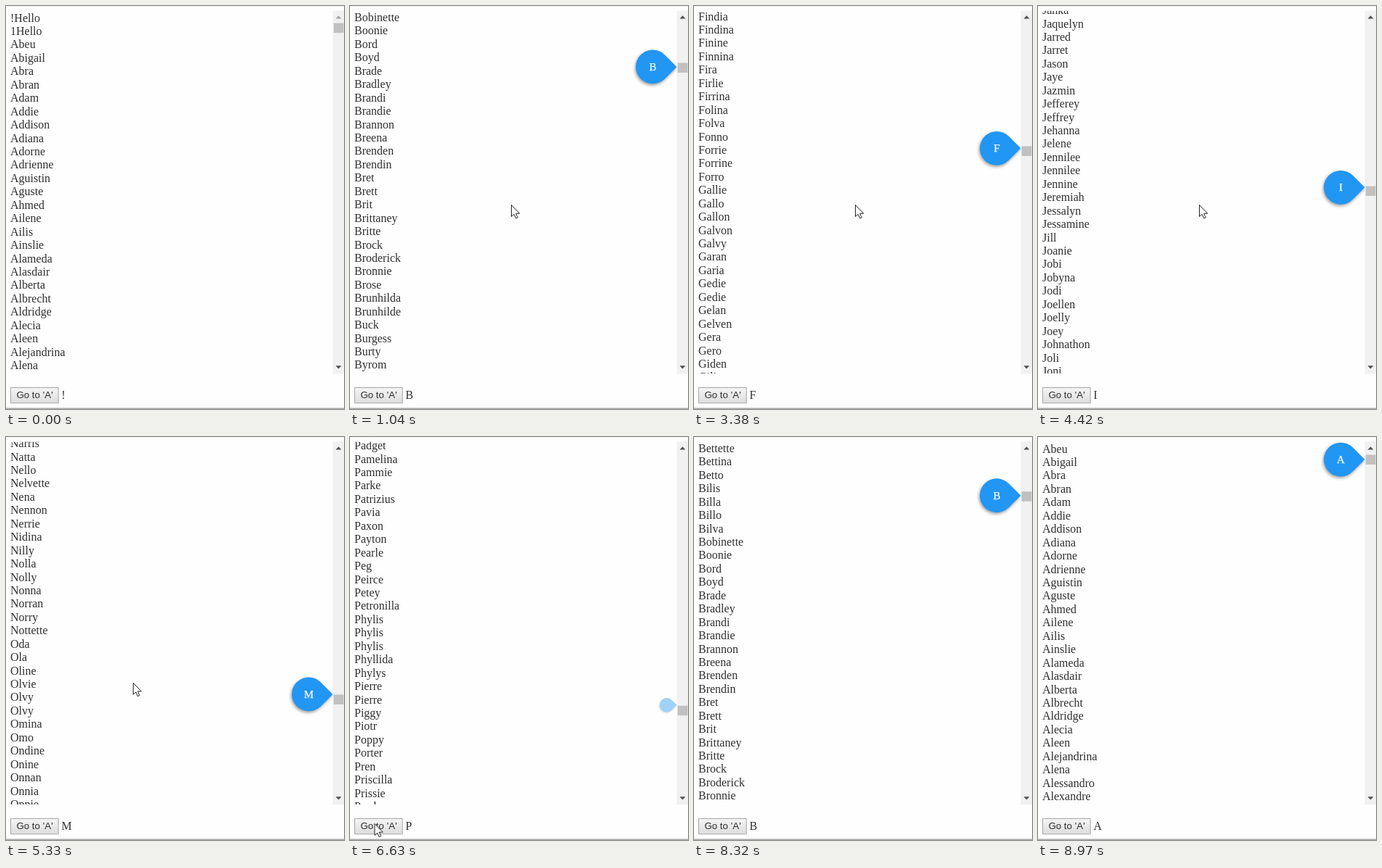
Write an HTML page that moves like this. It is 466x556 px and loops after 9.36 s.

```html
<!DOCTYPE html>
<html lang="en">
<head>
<meta charset="utf-8">
<title>Alphabet scroll list</title>
<style>
html, body { margin: 0; width: 100%; height: 100%; overflow: hidden; background: #fff; }
svg { display: block; width: 466px; height: 556px; }
text { font: 16px "Liberation Serif", "Times New Roman", serif; fill: #303030; white-space: pre; }
#button text { font: 13.33px "Liberation Sans", Arial, sans-serif; }
#bubble { filter: drop-shadow(-1px 2px 2px rgba(0, 0, 0, .4)); }
#bubble text { font-size: 15px; fill: #fff; stroke: #fff; stroke-width: .25; text-anchor: middle; }
</style>
</head>
<body>
<svg viewBox="0 0 466 556">
  <defs>
    <clipPath id="view"><rect x="0" y="6.7" width="450" height="500.3"/></clipPath>
    <linearGradient id="face" x2="0" y2="1">
      <stop stop-color="#f5f5f5"/><stop offset="1" stop-color="#dddddd"/>
    </linearGradient>
  </defs>
  <rect width="466" height="556" fill="#fefefe"/>
  <rect width="466" height="1" fill="#f0f0f0"/>
  <g id="rows" clip-path="url(#view)"></g>
  <rect x="450.5" y="6.5" width="15.5" height="501" fill="#f1f1f1"/>
  <path id="up" d="M454.5 17.5L458.5 13.2L462.5 17.5Z"/>
  <path d="M454.5 496.3L458.5 500.6L462.5 496.3Z" fill="#505050"/>
  <rect id="thumb" x="451.8" width="13.7" height="13.5" fill="#c1c1c1"/>
  <g id="bubble">
    <path d="M0 0L-16.5 16.5A23.4 23.4 0 1 1 -16.5 -16.5Z" fill="#2196f3"/>
    <text id="mark" x="-33" y="5"></text>
  </g>
  <g id="button">
    <rect x="6.5" y="526.5" width="65.7" height="21.3" fill="url(#face)" stroke="#a6a6a6"/>
    <text x="14.4" y="541.2">Go to 'A'</text>
  </g>
  <text id="status" x="76.6" y="541.8"></text>
  <rect y="554.6" width="466" height="1.1" fill="#8a8a8a"/>
  <path id="cursor" d="M0 0V16L3.7 12.7L6.2 18.4L8.7 17.3L6.2 11.7H11.3Z" fill="#fff" stroke="#222" stroke-width="1"/>
</svg>
<script>
const LOOP = 9360, STEP = 130, ROW = 18.44, ROWS_PER_PX = 2.15;
const $ = id => document.getElementById(id);
const clamp = x => Math.max(0, Math.min(1, x));
const ramp = (t, a, b) => clamp((t - a) / (b - a));
const swing = p => .5 - .5 * Math.cos(Math.PI * p);

// Filler names: seeded syllables, sorted inside each letter.
let seed = 7;
const rand = () => (seed = seed * 16807 % 2147483647) / 2147483647;
const pick = list => list[Math.floor(rand() * list.length)];
const starts = { A: 2, B: 85, C: 145, D: 226, E: 286, F: 340, G: 378, H: 412, I: 446, J: 463, K: 530,
  L: 570, M: 640, N: 705, O: 728, P: 746, Q: 800, R: 806, S: 850, T: 910, V: 955, W: 975 };
const vowels = ["a", "e", "i", "o"];
const middles = "l n r rl nd ll m rr tt nn lv d".split(" ");
const endings = "a ie y ine on ette ia an en is ina o".split(" ");
const isVowel = c => "AEIO".includes(c);

const names = [];
const letters = Object.keys(starts);
letters.forEach((c, i) => {
  const count = (starts[letters[i + 1]] || 1000) - starts[c];
  const group = Array.from({ length: count }, () =>
    c + (isVowel(c) ? "" : c === "Q" ? "ui" : pick(vowels)) + pick(middles) + pick(endings));
  group.sort().forEach((name, k) => names[starts[c] + k] = name);
});

const place = (at, list) => list.split(" ").forEach((name, k) => names[at + k] = name);
place(0, "!Hello 1Hello Abeu Abigail Abra Abran Adam Addie Addison Adiana Adorne Adrienne Aguistin Aguste " +
  "Ahmed Ailene Ailis Ainslie Alameda Alasdair Alberta Albrecht Aldridge Alecia Aleen Alejandrina Alena " +
  "Alessandro Alexandre Alfie");
place(118, "Bobinette Boonie Bord Boyd Brade Bradley Brandi Brandie Brannon Breena Brenden Brendin Bret Brett " +
  "Brit Brittaney Britte Brock Broderick Bronnie Brose Brunhilda Brunhilde Buck Burgess Burty Byrom Caitlin");
place(246, "Dennison Denys Derby Derick Derrek Devland Devonne Diane Dianemarie Diannne Dido Dillon Dionis Dodi " +
  "Dodi Dodie Doloritas Dominga Dominique Dona Donica Donnajean Donny Donny Doreen Dorelle Dorothea Dorthea");
place(419, "Harri Harris Harrison Harv Haskel Hayyim Heall Heall Heda Heddie Hedvige Hedwig Heindrick Helga " +
  "Henry Herb Hermie Hermina Hermine Herminia Herrick Herta Hill Hilly Hirsch Hobey Holmes");
place(483, "Janka Jaquelyn Jarred Jarret Jason Jaye Jazmin Jefferey Jeffrey Jehanna Jelene Jennilee Jennilee " +
  "Jennine Jeremiah Jessalyn Jessamine Jill Joanie Jobi Jobyna Jodi Joellen Joelly Joey Johnathon Joli Joni");
place(746, "Padget Pamelina Pammie Parke Patrizius Pavia Paxon Payton Pearle Peg Peirce Petey Petronilla Phylis " +
  "Phylis Phylis Phyllida Phylys Pierre Pierre Piggy Piotr Poppy Porter Pren Priscilla Prissie Prudence");

// Wheel scroll down as [time, row], then one eased run back to 'A'.
const wheel = [[60, 0], [1040, 118.03], [2340, 246.65], [4420, 483.57], [5460, 746.24]];
const BACK = 6630, BACK_TIME = 2253.5, TOP_A = 2;

function scrollAt(t) {
  const low = wheel[wheel.length - 1][1];
  if (t >= BACK) return low + (TOP_A - low) * swing(clamp((t - BACK) / BACK_TIME));
  let row = 0;
  for (let i = 1; i < wheel.length; i++) {
    const [t0, a] = wheel[i - 1], [t1, b] = wheel[i];
    row += (b - a) * ramp(t, t0, t1);
  }
  return row;
}

// The letter trails the list while the wheel is turning.
const letterAt = t => names[Math.floor(scrollAt(t < 6000 ? t - 220 : t) + .001)][0];

const bubbleSize = t => t < 5800 ? ramp(t, 60, 220)
  : t < 6500 ? 1 - ramp(t, 5800, 6050)
  : ramp(t, 6565, 6720);

const lines = Array.from({ length: 30 }, () => {
  const line = document.createElementNS("http://www.w3.org/2000/svg", "text");
  line.setAttribute("x", 6);
  return $("rows").appendChild(line);
});

function draw(t) {
  const top = scrollAt(t), first = Math.max(0, Math.floor(top) - 1);
  lines.forEach((line, k) => {
    line.textContent = names[first + k] || "";
    line.setAttribute("y", (21.6 + ROW * (first + k - top)).toFixed(2));
  });

  const offset = top / ROWS_PER_PX, size = bubbleSize(t);
  $("thumb").setAttribute("y", 23.6 + offset);
  $("up").setAttribute("fill", top > 0 ? "#505050" : "#a3a3a3");
  $("bubble").setAttribute("transform", `translate(450.5 ${30.2 + offset * .9785}) scale(${size})`);
  $("bubble").setAttribute("opacity", size);
  $("mark").setAttribute("opacity", ramp(size, .5, 1));
  const letter = t < STEP ? "!" : letterAt(t);
  $("mark").textContent = $("status").textContent = letter;

  const go = swing(ramp(t, 5200, 5590));
  $("cursor").setAttribute("transform", `translate(${222.5 - 188.5 * go} ${274.5 + 259 * go})`);
  $("cursor").setAttribute("visibility", t >= STEP && t < 8300 ? "visible" : "hidden");
}

const begin = performance.now();
function tick() {
  const t = (performance.now() - begin) % LOOP;
  draw(Math.floor(t / STEP) * STEP);
  requestAnimationFrame(tick);
}
tick();
</script>
</body>
</html>
```
